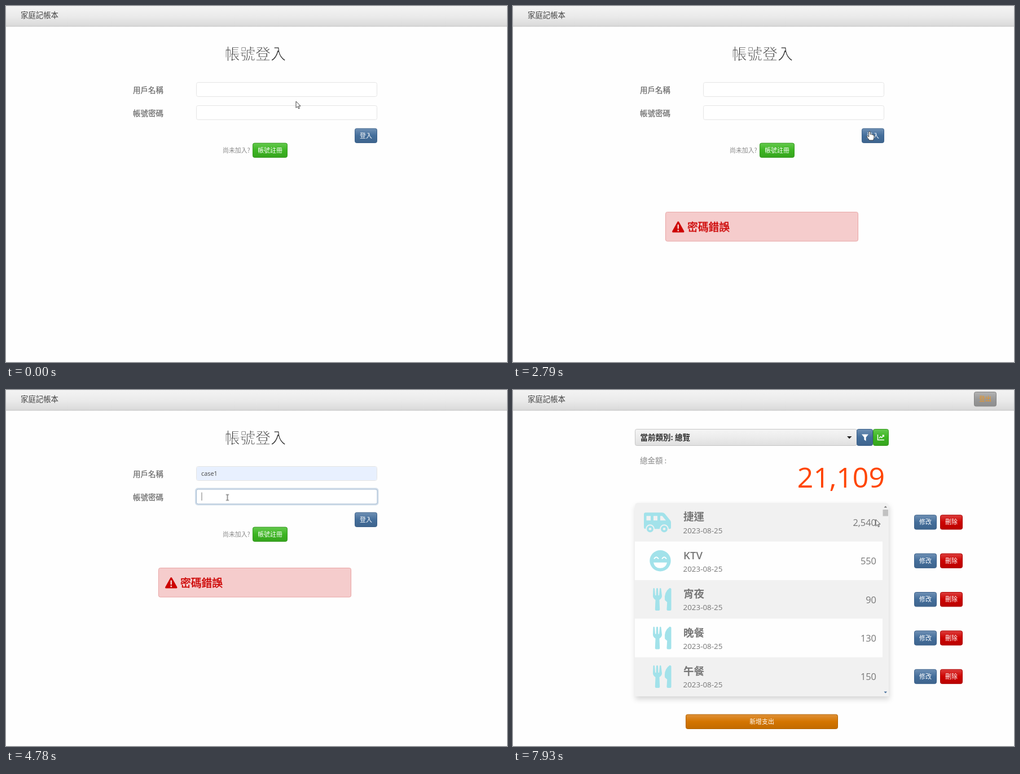
Recreate the animation shown at these times as an HTML page. Size 888 px wide and 631 px high, loop 8 s.

```html
<!DOCTYPE html>
<html lang="zh-Hant">
<head>
<meta charset="utf-8">
<title>家庭記帳本</title>
<style>
html, body { margin: 0; width: 100%; height: 100%; overflow: hidden; background: #fefefe; }
svg { display: block; width: 888px; height: 631px; font-family: "Open Sans", "Noto Sans CJK TC", "Noto Sans CJK", sans-serif; }
.cjk { font-family: "Noto Sans CJK TC", "Noto Sans CJK", sans-serif; }
.mid { text-anchor: middle; }
.end { text-anchor: end; }
/* outlines in the paper or ink colour give the weights between the installed ones */
.light { stroke: #fefefe; stroke-width: .9px; }
.label { font-size: 13.5px; fill: #6c6c6c; stroke: #6c6c6c; stroke-width: .25px; }
.warn { font-size: 18.8px; fill: #cd0200; stroke: #cd0200; stroke-width: .4px; }
.small { font-size: 10.9px; fill: #fff; }
.input { fill: #fff; stroke: #e4e4e4; }
.ring { fill: #fff; stroke: #a2b9d1; }
.glow { fill: #d2deea; }
.step { animation: 8s step-end infinite; }

.login { animation-name: login; }
.app { animation-name: app; }
.focus-name { animation-name: focusName; }
.focus-pass { animation-name: focusPass; }
.filled { animation-name: filled; }
.menu { animation-name: menu; }
.hover { animation-name: hover; }
.caret-name { animation-name: caretName; }
.typing { animation-name: typing; }
.arrow { animation-name: arrow; }
.beam { animation-name: beam; }
.hand { animation-name: hand; }
.alert { animation: alert 8s ease infinite; }
.cursor { animation: cursor 8s ease-in-out infinite; }

@keyframes login { 0% { opacity: 1 } 94.8%, 100% { opacity: 0 } }
@keyframes app { 0% { opacity: 0 } 94.8%, 100% { opacity: 1 } }
@keyframes focusName { 0%, 20.6%, 58.1% { opacity: 0 } 5.6%, 42.4% { opacity: 1 } 100% { opacity: 0 } }
@keyframes focusPass { 0%, 31.4%, 93.8%, 100% { opacity: 0 } 20.6%, 58.1% { opacity: 1 } }
@keyframes filled { 0%, 32.2%, 100% { opacity: 0 } 10.6%, 48.7% { opacity: 1 } }
@keyframes menu { 0%, 15.6%, 56.3%, 100% { opacity: 0 } 6.2%, 43.2% { opacity: 1 } }
@keyframes hover { 0%, 15.6%, 56.3%, 100% { opacity: 0 } 10.6%, 48.7% { opacity: 1 } }
@keyframes caretName {
  0%, 32% { transform: none; opacity: 1 }
  10.6%, 48.7% { transform: none; opacity: 0 }
  15.6%, 56.3%, 100% { transform: translateX(29px); opacity: 1 }
}
@keyframes typing {
  0%, 32.2% { transform: none }
  22.5%, 63.8% { transform: translateX(4.14px) }
  24.5%, 65.4% { transform: translateX(8.28px) }
  25.4%, 68.8% { transform: translateX(12.42px) }
  26.5%, 71.3%, 100% { transform: translateX(16.56px) }
}
@keyframes alert {
  0%, 33.9% { opacity: 0; transform: translateY(51px) }
  34%, 34.4% { opacity: 1; transform: translateY(51px) }
  46.9%, 72.4% { opacity: 1; transform: none }
  83.6%, 100% { opacity: 0; transform: translateY(-50px) }
}
@keyframes cursor {
  0%, .9% { transform: translate(514px, 169px) }
  5%, 9% { transform: translate(424px, 146px) }
  11.2% { transform: translate(428px, 180px) }
  13.5%, 27.5% { transform: translate(432.5px, 184px) }
  31%, 35.2% { transform: translate(632px, 222px) }
  40.6%, 45.6% { transform: translate(419.5px, 143px) }
  48.7%, 56.5% { transform: translate(428px, 181px) }
  58.7%, 84.3% { transform: translate(392.5px, 190.5px) }
  86.9% { transform: translate(480px, 268px); animation-timing-function: linear }
  89% { transform: translate(580px, 284px); animation-timing-function: linear }
  91.6% { transform: translate(652px, 240px) }
  93.1%, 94.8% { transform: translate(640px, 228px) }
  96.2%, 100% { transform: translate(643px, 229.5px) }
}
@keyframes arrow {
  0%, 10.3%, 28.4%, 36.3%, 46.5%, 85.2%, 94.8%, 100% { opacity: 1 }
  2.6%, 15.6%, 30%, 39.5%, 56.3%, 92.2% { opacity: 0 }
}
@keyframes beam {
  0%, 10.3%, 28.4%, 46.5%, 85.2%, 100% { opacity: 0 }
  2.6%, 15.6%, 39.5%, 56.3% { opacity: 1 }
}
@keyframes hand { 0%, 36.3%, 94.8%, 100% { opacity: 0 } 30%, 92.2% { opacity: 1 } }
</style>
</head>
<body>
<svg viewBox="0 0 888 631">
  <defs id="defs">
    <linearGradient id="nav" x2="0" y2="1"><stop stop-color="#f3f3f3"/><stop offset=".5" stop-color="#ebebeb"/><stop offset="1" stop-color="#d9d9d9"/></linearGradient>
    <linearGradient id="bar" x2="0" y2="1"><stop stop-color="#f5f5f5"/><stop offset=".5" stop-color="#ececec"/><stop offset="1" stop-color="#dfdfdf"/></linearGradient>
    <g id="van">
      <path fill-rule="evenodd" d="M235-17H264Q267-17 269-15L278-4Q280-2 280 0V10Q280 12 278 12H235Q232 12 232 9V-14Q232-17 235-17ZM236.500-11V-3H244V-11ZM249-11V-3H256V-11ZM261-11V-3H271L264.500-11Z"/>
      <g stroke="#f1f1f1" stroke-width="2"><circle cx="243" cy="12" r="7"/><circle cx="268" cy="12" r="7"/></g>
      <g fill="#f1f1f1"><circle cx="243" cy="12" r="2.300"/><circle cx="268" cy="12" r="2.300"/></g>
    </g>
    <g id="smile">
      <circle cx="261" r="18.700"/>
      <path d="M249 3H273Q271 13 261 13T249 3Z" fill="#fff"/>
      <path d="M250.500-4q3.500-5 7 0M264.500-4q3.500-5 7 0" fill="none" stroke="#fff" stroke-width="2" stroke-linecap="round"/>
    </g>
    <g id="food">
      <path d="M248.500-19q1.200-2 2.500 0l1 12h1.500l.5-12q1.500-2 3 0l.5 12h1.500l1-12q1.300-2 2.500 0l1.500 13q0 4-4.500 7l.7 17q0 2-2 2h-4.400q-2 0-2-2l.7-17q-4.500-3-4.500-7Z"/>
      <path d="M280.500-18V18q0 2-2 2h-4q-2 0-2-2l.7-13-4-3.500q-2-14 8.300-21.500 3 0 3 2Z"/>
    </g>
  </defs>

  <rect width="888" height="631" fill="#fefefe"/>
  <rect width="888" height="36" fill="url(#nav)"/>
  <path d="M0 36H888" stroke="#c0c0c0"/>
  <text class="cjk" x="26" y="21" font-size="13.400" fill="#444">家庭記帳本</text>

  <g class="step login">
    <text class="cjk light" x="387.500" y="95.300" font-size="27.200" fill="#2d2d2d">帳號登入</text>
    <text class="cjk label" x="225" y="154">用戶名稱</text>
    <text class="cjk label" x="225" y="195">帳號密碼</text>

    <rect class="input" x="337.500" y="135.500" width="320" height="25" rx="3"/>
    <g class="step focus-name">
      <rect class="glow" x="335" y="132.500" width="325.500" height="31" rx="5"/>
      <rect class="ring" x="337.500" y="135" width="320.500" height="26" rx="3"/>
    </g>
    <g class="step filled">
      <rect x="338" y="136" width="319" height="24" rx="2.500" fill="#e8f0fe"/>
      <text x="346" y="152" font-size="10.900" fill="#444">case1</text>
    </g>
    <g class="step focus-name"><path class="step caret-name" d="M347 140.500V155" stroke="#777"/></g>

    <rect class="input" x="337.500" y="176.500" width="320" height="25" rx="3"/>
    <g class="step focus-pass">
      <rect class="glow" x="335" y="173.500" width="325.500" height="31" rx="5"/>
      <rect class="ring" x="337.500" y="176" width="320.500" height="26" rx="3"/>
    </g>
    <text x="346" y="192.500" font-size="11" fill="#444">••••</text>
    <g class="step typing">
      <rect x="346" y="181" width="20" height="15" fill="#fff"/>
      <g class="step focus-pass"><path d="M347 181.500V196" stroke="#777"/></g>
    </g>

    <g id="loginButtons"></g>
    <text class="cjk" x="384" y="259.600" font-size="10.900" fill="#888">尚未加入?</text>

    <g class="alert">
      <rect x="270.500" y="315.500" width="341" height="51.500" rx="3" fill="#f5cccc" stroke="#e8a3a3"/>
      <path d="M292.800 333.500L302 350H283.600Z" fill="#cd0200" stroke="#cd0200" stroke-width="3" stroke-linejoin="round"/>
      <path d="M292.800 338.500V344" stroke="#f5cccc" stroke-width="2.600" stroke-linecap="round"/>
      <circle cx="292.800" cy="348" r="1.500" fill="#f5cccc"/>
      <text class="cjk warn" x="309" y="348.600">密碼錯誤</text>
    </g>

    <g class="step menu">
      <rect x="404" y="168" width="107" height="153" rx="3" fill="#000" opacity=".15"/>
      <path d="M412 168L418.500 161L425 168Z" fill="#292a2d"/>
      <rect x="404.500" y="167" width="106" height="153" rx="3" fill="#292a2d"/>
      <rect class="step hover" x="404.500" y="169.500" width="106" height="24.500" fill="#404144"/>
      <g id="menuItems" font-size="8.800" fill="#fff"></g>
    </g>
  </g>

  <g class="step app">
    <rect x="216.500" y="69.500" width="393" height="29" rx="3" fill="url(#bar)" stroke="#c6c6c6"/>
    <text class="cjk" x="225.500" y="89" font-size="13.500" font-weight="700" fill="#2d2d2d">當前類別: 總覽</text>
    <path d="M592 82H600.500L596.200 86.500Z" fill="#222"/>
    <g id="toolButtons"></g>
    <path d="M618 78.500H630L625.600 84V90.500L622.400 88V84Z" fill="#fff"/>
    <path d="M646.500 79V88.500H658M649 85.500L651.500 82.500L653.500 84.500L657 80.500M654.500 80.300H657.200V83" fill="none" stroke="#fff" stroke-width="1.500"/>
    <text class="cjk" x="225" y="130" font-size="13.500" fill="#8c8c8c">總金額 :</text>
    <text class="end" x="659" y="172.500" font-size="50" fill="#ff4500">21,109</text>

    <path d="M222 200H660Q666 200 666 206V543H216V206Q216 200 222 200Z" fill="#f1f1f1" style="filter: drop-shadow(1px 5px 5px rgba(0,0,0,.16))"/>
    <path d="M657.500 208.500H663L660.200 205.500Z" fill="#777"/>
    <rect x="655.500" y="212" width="9.500" height="11.500" fill="#c1c1c1"/>
    <path d="M657.500 534.500H663L660.200 537.500Z" fill="#446e9b"/>
    <g id="rows"></g>
    <g id="appButtons"></g>
  </g>

  <g class="cursor">
    <path class="step arrow" d="M0 0V11.500L2.700 9L4.500 13L6.300 12.200L4.500 8.300H8Z" fill="#fff" stroke="#333" stroke-width=".9"/>
    <path class="step beam" d="M-2.500-5H-.7L0-4.500L.7-5H2.500M0-4.500V4.500M-2.500 5H-.7L0 4.500L.7 5H2.500" fill="none" stroke="#333"/>
    <path class="step hand" d="M-1.300 1Q0-.8 1.300 1V5.500Q2.600 4.500 3.700 6Q5 5.200 6 6.600Q8 6.400 8 8.500V11Q7.500 13.500 6.500 16H-.5Q-2.500 13-5 9.500Q-4.500 7-1.300 10Z" fill="#fff" stroke="#333" stroke-width=".9"/>
  </g>
</svg>
<script>
const palette = {
  blue: ["#6f90b4", "#446e9b", "#3e648d", "#3b608a"],
  green: ["#64c94d", "#3cb521", "#36a41e", "#33991d"],
  red: ["#dc3f3e", "#cd0200", "#b90200", "#ad0200"],
  orange: ["#df9138", "#d47500", "#c26b00", "#b36300"],
  gray: ["#b3b3b3", "#999", "#8d8d8d", "#848484"]
};
const put = (id, html) => { document.getElementById(id).innerHTML = html; };

const gradient = ([name, [top, mid, low]]) =>
  `<linearGradient id="${name}" x2="0" y2="1"><stop stop-color="${top}"/>` +
  `<stop offset=".5" stop-color="${mid}"/><stop offset="1" stop-color="${low}"/></linearGradient>`;
document.getElementById("defs").insertAdjacentHTML("beforeend", Object.entries(palette).map(gradient).join(""));

const button = (x, y, w, color, text = "", h = 25.3, fill = "#fff") =>
  `<rect x="${x}" y="${y}" width="${w}" height="${h}" rx="3" fill="url(#${color})" stroke="${palette[color][3]}"/>` +
  `<text class="cjk small mid" x="${x + w / 2}" y="${y + h / 2 + 4.1}" style="fill:${fill}">${text}</text>`;

put("loginButtons", button(618.5, 217.2, 39, "blue", "登入") + button(437.5, 243.1, 61, "green", "帳號註冊"));

const accounts = ["case1", "sampleKitchens1", "case2", "sampleKitchens2", "青禾炭烤料理小館1", "青禾炭烤料理小館"];
put("menuItems", accounts.map((name, i) => `<text x="412.5" y="${184.7 + i * 24.55}">${name}</text>`).join(""));

put("toolButtons", button(609.5, 69.5, 28, "blue", "", 29) + button(638.5, 69.5, 27, "green", "", 29));

const entries = [
  ["捷運", "2,540", "van"], ["KTV", "550", "smile"], ["宵夜", "90", "food"],
  ["晚餐", "130", "food"], ["午餐", "150", "food"]
];
const rowY = i => 234.3 + i * 68.4;
put("rows", entries.map(([title, cost, icon], i) => `<g transform="translate(0 ${rowY(i)})">
  ${i % 2 ? '<rect x="216" y="-34.2" width="439" height="68.4" fill="#fefefe"/>' : ""}
  <use href="#${icon}" fill="#a2e2ea"/>
  <text x="302" y="-3" font-size="18.6" font-weight="600" fill="#777">${title}</text>
  <text x="301.5" y="19.3" font-size="13.4" fill="#777">2023-08-25</text>
  <text class="end" x="644" y="6.5" font-size="16.4" fill="#777">${cost}</text></g>`).join(""));

put("appButtons", entries.map((_, i) => {
  const y = rowY(i) - 12.6;
  return button(711.5, y, 39, "blue", "修改") + button(757.5, y, 39, "red", "刪除");
}).join("") + button(817.5, 3.5, 39, "gray", "登出", 25.3, "#f0961e") + button(306.5, 575.2, 269, "orange", "新增支出"));
</script>
</body>
</html>
```
